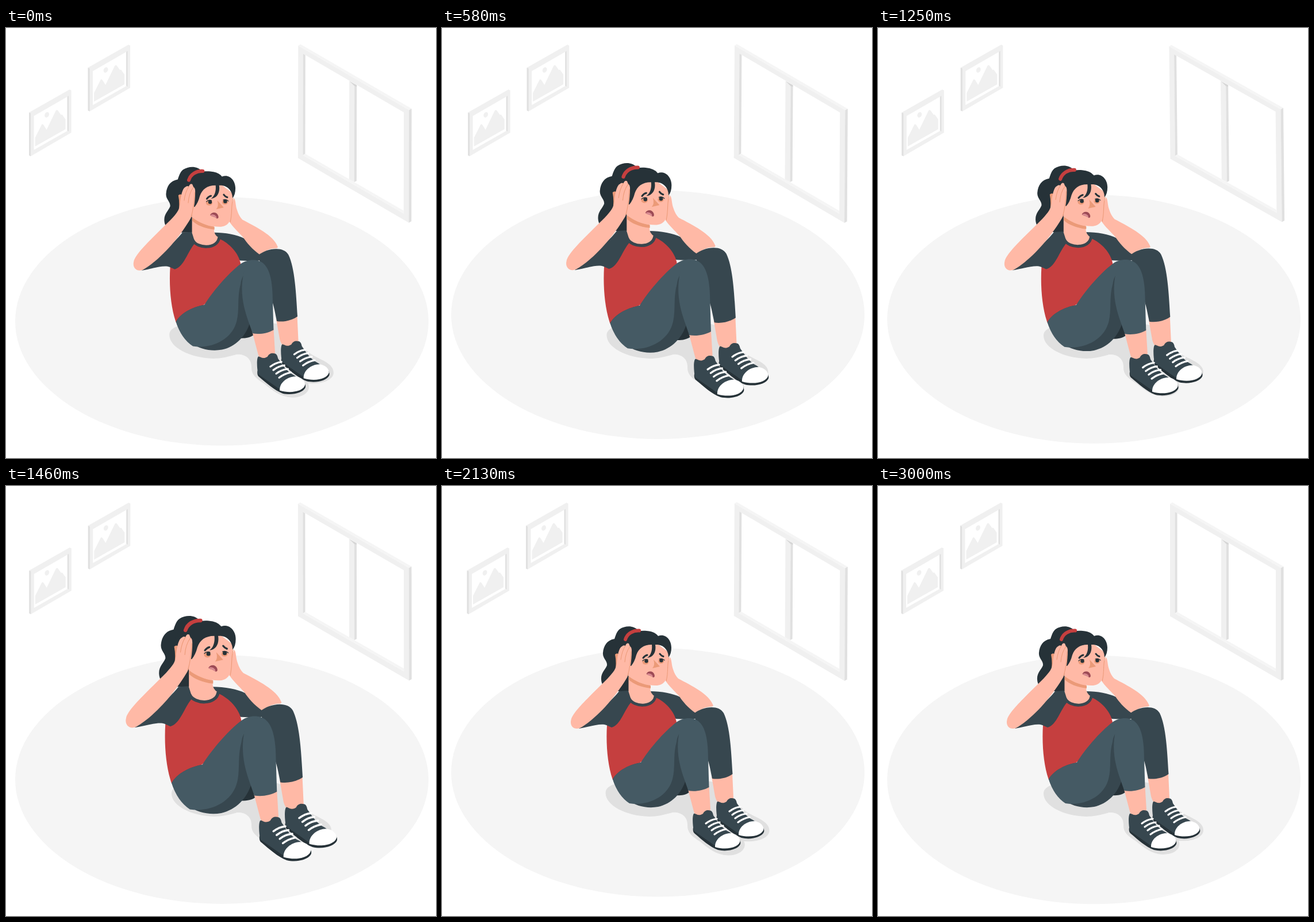
Write an HTML page that moves like this. It is 748 px wide and 748 px high and loops after 3040 ms.

```html
<!DOCTYPE html>
<html lang="en">
<head>
<meta charset="utf-8">
<title>Anxious woman</title>
<style>
  html, body { margin: 0; width: 100%; height: 100%; overflow: hidden; background: #fff; }
  svg { display: block; width: 100vw; height: 100vh; }
  .pale { fill: #f0f0f0; }
  .edge { fill: #e0e0e0; }
  .white { fill: #fff; }
  .ink { fill: #263238; }
  .dark { fill: #37474f; }
  .denim { fill: #455a64; }
  .red { fill: #c53f3f; }
  .skin { fill: #ffb9a6; }
  .shade { fill: #eb9a78; }
  .line { fill: none; stroke-linecap: round; }
</style>
</head>
<body>
<svg viewBox="0 0 748 748">
  <defs>
    <g id="picture">
      <path class="pale" d="M40.500 147L111 107L114 108.500V182L43.500 223L40.500 221.500Z"/>
      <path class="edge" d="M40.500 147L43.500 148.500V223L40.500 221.500Z"/>
      <path class="white" d="M49 153L108 119V178.500L49 212Z"/>
      <path class="edge" d="M107 119.500L109.500 118V180L107 178.500Z"/>
      <path class="pale" d="M51 206V191L62.500 168Q64 166 66 169L71 177L87 144Q89 141 91 144L96 151L98 150.500L104 159V176Z"/>
      <ellipse class="pale" cx="71.500" cy="151" rx="3.700" ry="5" transform="rotate(25 71.500 151)"/>
    </g>
    <g id="shoe">
      <path class="ink" d="M478 573C477 578 478 582 481 584C493 594 507 607 521 612C537 616 556 611 560 602Q561 598 559 595Z"/>
      <path class="dark" d="M479 549C482 547 486 555 495 549C498 543 503 542 509 544Q512 546 513 552C520 562 528 575 541 581C552 588 553 600 545 605C532 611 519 608 509 600L479 579C477 570 476 553 479 549Z"/>
      <path class="white" d="M516 607C515 594 529 583 543 583C553 584 559 590 559.500 597C557 608 536 613 516 607Z"/>
      <g class="line" stroke="#fff" stroke-width="3.200">
        <path d="M500 566Q509 559 519 558M505 572Q514 565 524 564M510 578Q519 571 530 570M515 585Q524 578 535 576"/>
      </g>
    </g>
  </defs>

  <ellipse id="floor" cx="375.500" cy="511" rx="359.500" ry="216.300" fill="#f5f5f5"/>

  <g id="pictures">
    <use href="#picture"/>
    <use href="#picture" x="102.500" y="-78"/>
  </g>

  <g id="window">
    <path fill="#f5f5f5" d="M508 31L512 28.500L705.500 140L701 142.500Z"/>
    <path class="pale" fill-rule="evenodd" d="M508 31L701 142.500V338.500L508 226.500ZM516.500 45V221.500L692 322.500V146.500Z"/>
    <path class="edge" d="M701 142.500L705.500 140V336L701 338.500Z"/>
    <path class="edge" d="M516.500 45L520.500 47.300V219L516.500 221.500Z"/>
    <path fill="#f5f5f5" d="M516.500 221.500L520.500 219L692 317.500V322.500Z"/>
    <path class="pale" d="M597 92L606 97V268L597 263Z"/>
    <path class="edge" d="M606 97L610 99.500V266L606 268Z"/>
    <path fill="#d6d6d6" d="M597.500 92.500L610 99.700V102L606 101Z"/>
  </g>

  <path id="shadow" class="edge" d="M288 535C288 521 310 515 345 515H462C490 517 500 545 521 562C535 576 566 580 566 599C566 612 545 619 523 617C528 628 519 641 495 641C476 640 462 629 449 618C436 610 427 603 427 591C428 575 416 567 402 568C388 572 376 575 362 575C322 574 288 556 288 535Z"/>

  <g id="woman">
    <!-- ponytail -->
    <path class="ink" d="M341 251C334 243 320 242 309 249C304 253 302 260 300 266C287 268 281 278 280 290C279 300 288 304 287 312C284 320 276 325 277 337C278 351 290 358 306 357H326L340 300Z"/>

    <!-- far arm -->
    <path class="dark" d="M361 357C382 357 402 361 414 367C424 380 435 388 446 394Q445 403 440 405C429 407 418 405 407 405L371 380Z"/>
    <path class="skin" d="M397 298C400 304 399 311 402 319Q405 329 411 335C434 347 464 362 471 380Q474 384 466 384C456 385 449 389 441 395C428 386 418 374 413 366C404 356 394 347 389 339C389 323 391 308 397 298Z"/>

    <!-- far leg -->
    <path class="skin" d="M469 506L475 540Q479 555 489 554Q503 552 507 543L505 500Z"/>
    <path class="dark" d="M438 396C452 384 481 379 490 395C501 418 503 460 505.500 501C496 508 481 511 470 509C466 490 464 474 455 460Z"/>
    <path class="ink" d="M422 508L430 533C423 538 413 539 402 538Z"/>
    <use href="#shoe"/>

    <!-- near leg -->
    <path class="skin" d="M428 528L438 566Q440 575 449 576Q464 574 467 563L464.500 522Z"/>
    <use href="#shoe" x="-41" y="21"/>

    <!-- shirt -->
    <path class="red" d="M326 372L372 368C388 375 405 392 408 411L370 465L297 511C288 485 285 450 287 416L297 416Z"/>
    <path class="dark" d="M297 510C306 494 328 484 346 481L413 430L424 511C417 535 399 553 376 558C343 564 308 546 297 510Z"/>
    <path class="denim" d="M297 510C306 494 328 484 346 481C358 461 385 428 409 410C420 403 436 401 447 410C420 420 411 426 408 445C401 470 407 492 400 513C391 541 358 557 326 552Q306 539 297 510Z"/>
    <path class="denim" d="M413 427C418 408 438 399 450 413C460 425 463 448 463 475L464.500 524C454 530 440 532 428.500 530C419 502 404 470 413 427Z"/>

    <!-- neck -->
    <path class="skin" d="M324.500 325V371C335 384 363 383 371 366Q362 362 362 350V335Z"/>
    <path class="shade" d="M325 331C335 339 351 346 363 347V352C346 350 332 344 325 337Z"/>
    <path class="dark" d="M324 356L308 357C296 373 266 398 238 422C257 419 276 412 286 416L295 420C311 416 317 389 330 375Z"/>
    <path class="line" stroke="#37474f" stroke-width="5" d="M326 370C333 385 368 386 371 366"/>

    <!-- face -->
    <path class="skin" d="M330 282L324 330C338 341 356 347 372 347C386 347 392 337 392 324L395 290L366 268Z"/>
    <path class="line" stroke="#eb9a78" stroke-width="1" d="M395 298C391 312 394 325 390 339"/>
    <path class="shade" d="M368 302L379 314L366 317Q371 312 368 302Z"/>
    <ellipse class="shade" cx="354" cy="306" rx="5.500" ry="4.500"/>
    <ellipse class="shade" cx="381" cy="305" rx="5" ry="4"/>
    <circle class="ink" cx="355.500" cy="304.500" r="3.200"/>
    <circle class="ink" cx="381.500" cy="303.500" r="3.200"/>
    <path class="line" stroke="#263238" stroke-width="1.200" d="M349 304Q353 300 358 302M378 301Q383 299 387 303"/>
    <path class="line" stroke="#263238" stroke-width="3" d="M350 299Q353 295 357 294M379 292Q381 295 385 296.500"/>
    <path fill="#9d4a55" d="M355.500 327C358 321 367 321 369.500 328Q371 333 367 333C363 329 359 330 355.500 327Z"/>
    <path fill="#d98a91" d="M356 327Q361 324 366 329L367 333C363 329 359 330 356 327Z"/>

    <!-- fringe -->
    <path class="ink" d="M303 276C315 260 336 250 356 252Q370 253 376 261C388 256 399 267 399 281Q399 292 394 298C394 285 385 275 371 276C373 288 368 298 357 299C364 294 366 285 365 276C350 276 342 283 338 294Q335 306 329 313L304 309Z"/>
    <path class="line" stroke="#c53f3f" stroke-width="6" stroke-linecap="butt" d="M319 267C322 257 332 251 343 251.500"/>

    <!-- near arm -->
    <path class="shade" d="M301 293Q307 288 309 298L306 320L301 325Q304 308 301 293Z"/>
    <path class="skin" d="M224.500 407C227 393 256 367 288 335C299 323 303 318 304 307C305 295 308 281 313 279Q316 276 319 278Q321 272 325 274L327 279Q330 280 330 287C330 304 327 323 322 333C305 362 273 402 240 421C229 425 222 417 224.500 407Z"/>
    <path class="line" stroke="#eb9a78" stroke-width="1" d="M319 278Q313 287 311 302M327 279Q319 290 318 306M329 288Q328 313 323 330"/>
  </g>
</svg>
<script>
  const LOOP = 3040, FRAMES = 73;
  const part = id => document.getElementById(id);
  const [floor, pictures, pane, shadow, woman] =
    ["floor", "pictures", "window", "shadow", "woman"].map(part);

  // Linear tracks of [phase, value].
  const heartbeat = [[0, 1], [.1, 1.1], [.3, 1], [.4, 1], [.5, 1.1], [.6, 1], [1, 1]];
  const shake = [0, -1, 2, -4, 4, -4, 4, -4, 2, -1, 0].map((x, i) => [i / 10, x * 1.496]);
  const sway = [[0, 0], [.25, 1], [.75, -1], [1, 0]];
  const float = [[0, 0], [.5, -14.96], [1, 0]];

  function at(track, phase) {
    const i = track.findIndex(([p]) => p > phase);
    const [p0, v0] = track[i - 1], [p1, v1] = track[i];
    return v0 + (v1 - v0) * (phase - p0) / (p1 - p0);
  }

  const scaleAbout = (x, y, s) => `translate(${x} ${y}) scale(${s}) translate(${-x} ${-y})`;
  const move = (el, transform) => el.setAttribute("transform", transform);

  function draw(ms) {
    // Stepped at 24 fps; the cycle begins one step in.
    const step = Math.floor((ms % LOOP + 5) * FRAMES / LOOP) + 1;
    const slow = step % FRAMES / FRAMES;
    const fast = slow * 2 % 1;
    move(woman, scaleAbout(392, 440, at(heartbeat, slow)));
    move(shadow, scaleAbout(427, 578, at(heartbeat, fast)));
    move(floor, `translate(0 ${at(float, fast)})`);
    move(pictures, `translate(${at(shake, fast)} 0)`);
    move(pane, `rotate(${at(sway, fast)} 607 184)`);
  }

  const start = performance.now();
  function tick() {
    draw(performance.now() - start);
    requestAnimationFrame(tick);
  }
  tick();
</script>
</body>
</html>
```
